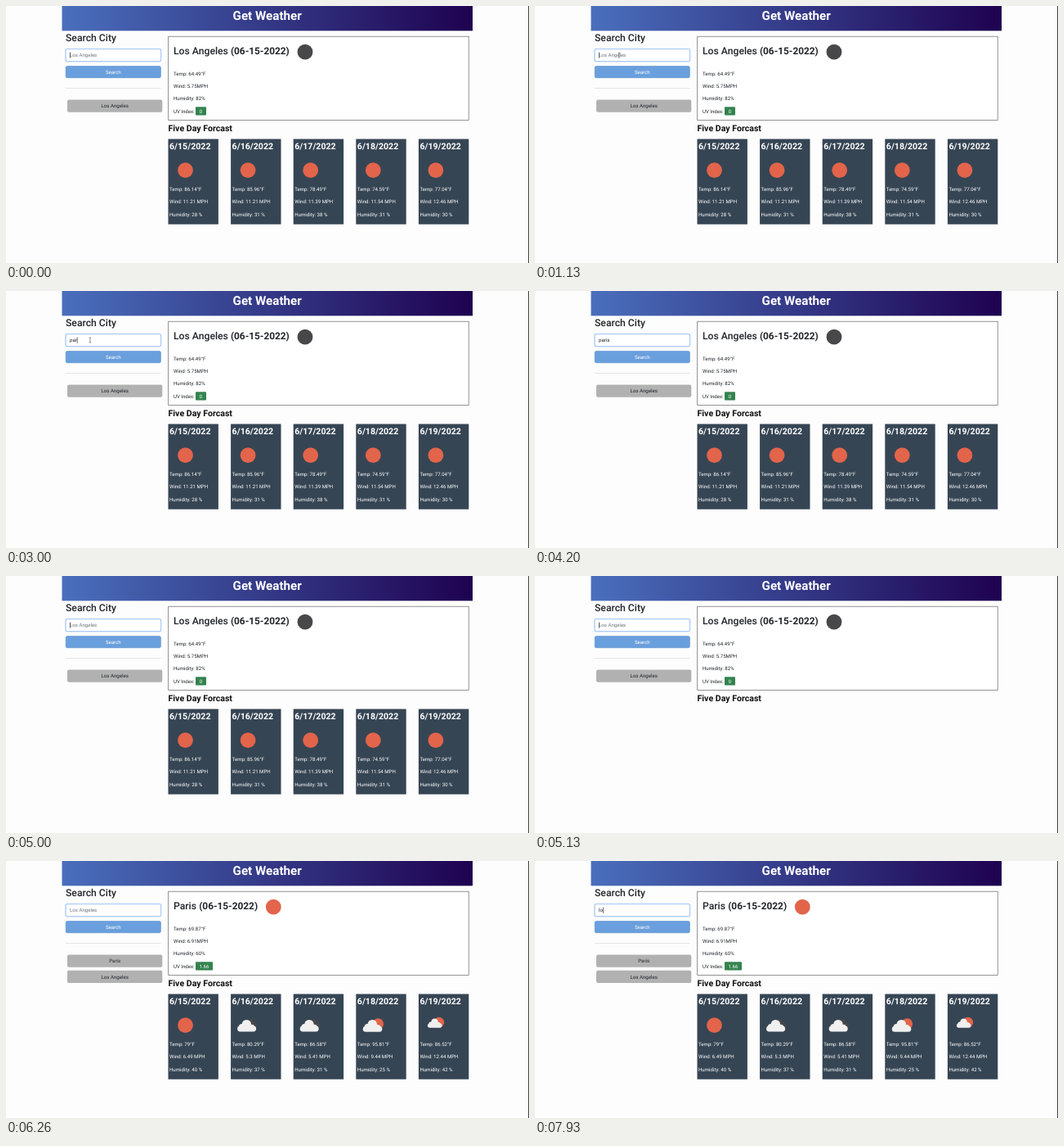
Animation, 640 px wide and 314 px high, one loop 8000 ms. Source, as an HTML page:

```html
<!DOCTYPE html>
<html lang="en">
<head>
<meta charset="utf-8">
<title>Get Weather</title>
<style>
  html, body { margin: 0; width: 100%; height: 100%; overflow: hidden; background: #fdfdfd; }
  svg { display: block; width: 640px; height: 314px; }
  text { font-family: Roboto, "Liberation Sans", sans-serif; font-size: 6.1px; fill: #212529; white-space: pre; text-rendering: geometricPrecision; }
  .h1 { font-size: 15.2px; font-weight: 700; fill: #fff; }
  .h2 { font-size: 12.2px; font-weight: 500; }
  .date { font-size: 11.85px; font-weight: 700; }
  .h3 { font-size: 10.6px; font-weight: 700; }
  .dark { fill: #111; }
  .white { fill: #fff; }
  .hint { fill: #6c757d; }
  .mid { text-anchor: middle; }
</style>
</head>
<body>
<svg id="stage" viewBox="0 0 640 314">
  <defs>
    <linearGradient id="bar">
      <stop offset="0" stop-color="#4a6fbd"/>
      <stop offset="1" stop-color="#1e0250"/>
    </linearGradient>
  </defs>
</svg>
<script>
const LOOP = 8000;
const SUN = '#e2644b', NIGHT = '#48484a', CLOUD = '#f0f0f0';
const stage = document.getElementById('stage');

function add(parent, tag, attrs = {}, content) {
  const el = document.createElementNS('http://www.w3.org/2000/svg', tag);
  for (const k in attrs) el.setAttribute(k, attrs[k]);
  if (content !== undefined) el.textContent = content;
  parent.appendChild(el);
  return el;
}
const group = (parent = stage, transform = '') => add(parent, 'g', { transform });
const text = (p, x, y, s, cls = '') => add(p, 'text', { x, y, class: cls }, s);
const disc = (p, cx, cy, r, fill) => add(p, 'circle', { cx, cy, r, fill });
const rect = (p, x, y, width, height, fill, more) =>
  add(p, 'rect', { x, y, width, height, fill, ...more });
const show = (el, on) => el.setAttribute('visibility', on ? 'visible' : 'hidden');

function cloud(p, x, y, scale, fill) {
  const g = group(p, `translate(${x} ${y}) scale(${scale})`);
  rect(g, 0, 8, 23.5, 7, fill, { rx: 3.5 });
  disc(g, 5.5, 9, 3.6, fill);
  disc(g, 11.5, 6, 5.8, fill);
  disc(g, 18, 9.8, 3.6, fill);
}

// Icons are drawn around their own centre.
const icons = {
  sun: g => disc(g, 0, 0, 9.4, SUN),
  night: g => disc(g, 0, 0, 9.4, NIGHT),
  overcast: g => { cloud(g, -4, -7.5, .66, NIGHT); cloud(g, -13, -7, .98, CLOUD); },
  partly: g => { disc(g, 6, -1.7, 6.8, SUN); cloud(g, -12.5, -7, 1, CLOUD); },
  shower: g => { disc(g, 4, -3.6, 6.3, SUN); cloud(g, -10, -8.3, .75, CLOUD); }
};

const cities = [
  {
    name: 'Los Angeles', dateX: 274.9, icon: 'night', iconX: 366,
    now: ['64.49', '5.75', 82], uv: '0', uvW: 13,
    days: [['86.14', '11.21', 28, 'sun'], ['85.96', '11.21', 31, 'sun'], ['78.49', '11.39', 38, 'sun'],
           ['74.59', '11.54', 31, 'sun'], ['77.04', '12.46', 30, 'sun']]
  },
  {
    name: 'Paris', dateX: 236.2, icon: 'sun', iconX: 327.3,
    now: ['69.87', '6.91', 60], uv: '1.66', uvW: 21,
    days: [['79', '6.49', 40, 'sun'], ['80.29', '5.3', 37, 'overcast'], ['86.58', '5.41', 31, 'overcast'],
           ['95.81', '9.44', 25, 'partly'], ['86.52', '12.44', 42, 'shower']]
  }
];

function drawNow(c) {
  const g = group();
  text(g, 205, 59.4, c.name, 'h2');
  text(g, c.dateX, 59.4, '(06-15-2022)', 'date');
  icons[c.icon](group(g, `translate(${c.iconX} 56.2)`));
  const [temp, wind, hum] = c.now;
  [`Temp: ${temp}°F`, `Wind: ${wind}MPH`, `Humidity: ${hum}%`, 'UV Index:']
    .forEach((s, i) => text(g, 205, 84.7 + i * 15.3, s));
  rect(g, 232, 123.3, c.uvW, 10.3, '#33834f', { rx: .8 });
  text(g, 232 + c.uvW / 2, 130.6, c.uv, 'white mid');
  return g;
}

function drawDays(c) {
  const g = group();
  c.days.forEach(([temp, wind, hum, icon], i) => {
    const card = group(g, `translate(${198.5 + i * 76.6} 162.5)`);
    rect(card, 0, 0, 61.4, 104.2, '#364554');
    text(card, 1.5, 12.8, `6/${15 + i}/2022`, 'h3 white');
    icons[icon](group(card, 'translate(21 38.2)'));
    [`Temp: ${temp}°F`, `Wind: ${wind} MPH`, `Humidity: ${hum} %`]
      .forEach((s, j) => text(card, 1.5, 63.6 + j * 15.2, s, 'white'));
  });
  return g;
}

function cityButton(y, name) {
  const g = group();
  rect(g, 75, y, 116.3, 15.3, '#b1b1b1', { rx: 2 });
  text(g, 133.2, y + 9.8, name, 'mid');
  return g;
}

// Page frame
rect(stage, 68.5, 0, 502.5, 30.3, 'url(#bar)');
text(stage, 319.7, 17.1, 'Get Weather', 'h1 mid');
rect(stage, 639, 0, 1, 314, '#444');
text(stage, 73, 43.1, 'Search City', 'h2');
rect(stage, 72.2, 51.7, 118.2, 16.8, '#c3dafc', { rx: 2.8 });
rect(stage, 73.2, 52.7, 116.2, 14.8, '#fff', { rx: 1.8, stroke: '#8ab6f5', 'stroke-width': .6 });
rect(stage, 73.2, 73.5, 116.2, 14.2, '#6a9fdd', { rx: 1.8, stroke: '#5b8fcf', 'stroke-width': .6 });
text(stage, 131.3, 82.6, 'Search', 'white mid');
rect(stage, 73, 100, 116.5, .5, '#ccc');
rect(stage, 198.7, 37.2, 367.5, 102.2, '#fff', { stroke: '#666', 'stroke-width': .7 });
text(stage, 198.5, 153.2, 'Five Day Forcast', 'h3 dark');

const hint = text(stage, 78, 62.2, 'Los Angeles', 'hint');
const field = text(stage, 78, 62.2, '');
const caret = rect(stage, 78, 56.5, .6, 7.2, '#111');
const nowViews = cities.map(drawNow);
const dayViews = cities.map(drawDays);
const parisButton = cityButton(114.5, 'Paris');
const topButton = cityButton(114.5, 'Los Angeles');
const lowButton = cityButton(133.7, 'Los Angeles');
const beam = group();
add(beam, 'path', {
  d: 'M-1.2 -3.2Q0 -3.2 0 -2.4Q0 -3.2 1.2 -3.2M0 -2.4V2.4M-1.2 3.2Q0 3.2 0 2.4Q0 3.2 1.2 3.2',
  fill: 'none', stroke: '#444', 'stroke-width': .6
});

// Typed text from each time on
const typing = [[0, ''], [2400, 'p'], [2930, 'pa'], [3000, 'par'], [3130, 'pari'],
                [3730, 'paris'], [5000, ''], [7860, 'l'], [7930, 'lo']];
// The caret toggles at these times; a key press turns it on again.
const blinks = [260, 730, 1260, 1730, 2260, 2400, 3600, 3730, 4200, 4730, 5200, 5730, 6200, 6730, 7200, 7730];
const CLEARED = 5130, SAVED = 5400, LOADED = 6260;

function draw(t) {
  const typed = typing.filter(k => k[0] <= t).pop()[1];
  if (field.textContent !== typed) field.textContent = typed;
  show(hint, !typed);
  caret.setAttribute('x', 78 + (typed ? field.getComputedTextLength() : 0));
  show(caret, blinks.filter(b => b <= t).length % 2 === 0);

  const loaded = t >= LOADED, saved = t >= SAVED;
  show(nowViews[0], !loaded);
  show(nowViews[1], loaded);
  show(dayViews[0], t < CLEARED);
  show(dayViews[1], loaded);
  show(topButton, !saved);
  show(parisButton, saved);
  show(lowButton, saved);

  const p = Math.min(1, Math.max(0, (t - 400) / 730));
  const ease = 1 - (1 - p) ** 3;
  beam.setAttribute('transform', `translate(${86 + 17 * ease} ${62 - 2 * ease})`);
  show(beam, t >= 400 && t < 3200);
}

const start = performance.now();
function tick() {
  draw((performance.now() - start) % LOOP);
  requestAnimationFrame(tick);
}
draw(0);
requestAnimationFrame(tick);
</script>
</body>
</html>
```
